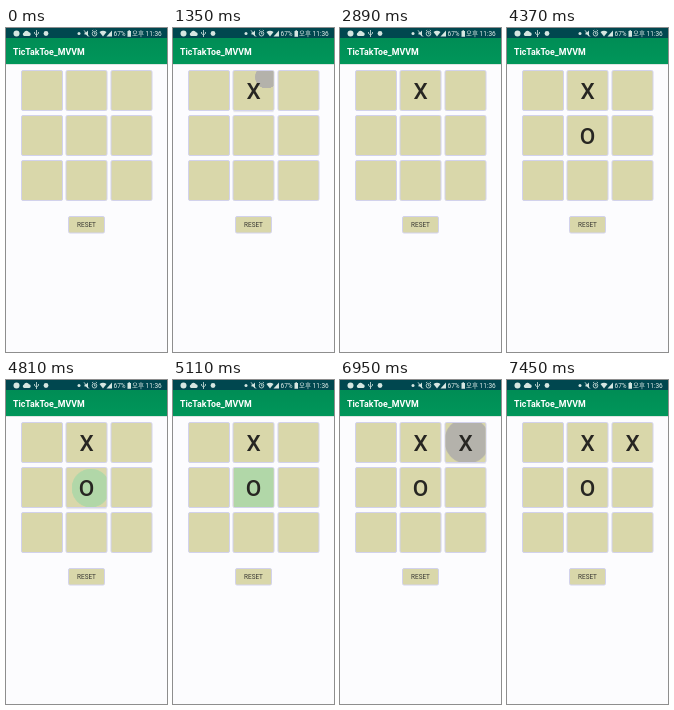
These frames come from a looping animation (161x324 px, 8000 ms). An HTML page:

```html
<!DOCTYPE html>
<html lang="ko">
<head>
<meta charset="utf-8">
<title>TicTakToe</title>
<style>
html, body { margin: 0; width: 100%; height: 100%; overflow: hidden; background: #fcfcfe; }
svg { display: block; width: 100vw; height: 100vh; }
text { font-family: Roboto, "Noto Sans CJK KR", "Noto Sans CJK", sans-serif; }
.cell { fill: #d9d7aa; stroke: #d2d2ec; stroke-width: 1; }
.mark { font-size: 22.5px; font-weight: 500; fill: #272622; text-anchor: middle; }
.status { font-size: 6.5px; fill: #e2eeea; }
.icon { fill: #d5e6e1; }
.line { fill: none; stroke: #d5e6e1; stroke-width: .8; }

.mark, .drift, .wave, .lift { animation: 8s linear infinite both; }
.lift { fill: #8a8aa0; }

.a .mark { animation-name: showA; animation-timing-function: step-end; }
.b .mark { animation-name: showB; animation-timing-function: step-end; }
.c .mark { animation-name: showC; animation-timing-function: step-end; }
@keyframes showA { 0% { opacity: 0 } 12.125%, 100% { opacity: 1 } }
@keyframes showB { 0% { opacity: 0 } 54.625%, 100% { opacity: 1 } }
@keyframes showC { 0% { opacity: 0 } 82.75%, 100% { opacity: 1 } }

/* wave: grows from the touch point, then fades */
.wave { fill: #b4b2ab; }
.b .wave { fill: #b1d7a8; }
.a .wave { animation-name: waveA; }
.b .wave { animation-name: waveB; }
.c .wave { animation-name: waveC; }
@keyframes waveA {
  0%, 12.125% { transform: scale(0); opacity: 0 }
  14% { opacity: 1 }
  25% { transform: scale(1); opacity: 1 }
  31.125%, 100% { transform: scale(1); opacity: 0 }
}
@keyframes waveB {
  0%, 54.625% { transform: scale(0); opacity: 0 }
  56.5% { opacity: 1 }
  63.5% { transform: scale(1) }
  65% { opacity: 1 }
  70.625%, 100% { transform: scale(1); opacity: 0 }
}
@keyframes waveC {
  0%, 82.75% { transform: scale(0); opacity: 0 }
  84% { opacity: 1 }
  88.375% { transform: scale(1); opacity: 1 }
  92.875%, 100% { transform: scale(1); opacity: 0 }
}

/* drift: the wave centre slides to the middle of the cell */
.drift { animation-timing-function: ease-in; }
.a .drift { animation-name: driftA; }
.b .drift { animation-name: driftB; }
.c .drift { animation-name: driftC; }
@keyframes driftA { 0%, 12.125% { transform: translate(16px, -16px) } 25%, 100% { transform: none } }
@keyframes driftB { 0%, 54.625% { transform: translate(8px, 2px) } 63.5%, 100% { transform: none } }
@keyframes driftC { 0%, 82.75% { transform: translate(4px, -3px) } 88.375%, 100% { transform: none } }

.a .lift { animation-name: liftA; }
.b .lift { animation-name: liftB; }
.c .lift { animation-name: liftC; }
@keyframes liftA { 0%, 12.125% { opacity: 0 } 15%, 19% { opacity: .18 } 22%, 100% { opacity: 0 } }
@keyframes liftB { 0%, 54.625% { opacity: 0 } 57%, 61% { opacity: .18 } 63.5%, 100% { opacity: 0 } }
@keyframes liftC { 0%, 82.75% { opacity: 0 } 84%, 88% { opacity: .15 } 91%, 100% { opacity: 0 } }
</style>
</head>
<body>
<svg viewBox="0 0 161 324" preserveAspectRatio="none">
  <defs>
    <linearGradient id="bar" x2="0" y2="1">
      <stop stop-color="#008d55"/>
      <stop offset="1" stop-color="#00965a"/>
    </linearGradient>
    <rect id="box" class="cell" x="-20.5" y="-19.5" width="41" height="40" rx="1.5"/>
    <g id="row">
      <use href="#box" x="36"/>
      <use href="#box" x="80.5"/>
      <use href="#box" x="125.5"/>
    </g>
    <clipPath id="inside"><rect x="-20" y="-19" width="40" height="39" rx="1"/></clipPath>
  </defs>

  <rect width="161" height="324" fill="#fcfcfe"/>
  <rect y="10" width="161" height="26" fill="url(#bar)"/>
  <rect y="36" width="161" height="1" fill="#dde6e3"/>
  <rect width="161" height="10" fill="#00474f"/>

  <g class="icon">
    <circle cx="10.5" cy="5.5" r="3"/>
    <path d="M18 8a1.8 1.8 0 0 1 0-3.4a2.7 2.7 0 0 1 5-.3a1.9 1.9 0 0 1 .4 3.7z"/>
    <circle cx="40" cy="5.5" r="2.4"/>
    <circle cx="73" cy="5.5" r="1.5"/>
    <path d="M78.5 4.5h1.5l2-2v6l-2-2h-1.5z"/>
    <path d="M93.5 4q3.5-2.6 7 0l-3.5 4.5z"/>
    <path d="M106 2.5v6h-5.5z"/>
    <path d="M121.5 3h1v-.8h1.5v.8h1v5.7h-3.5z"/>
  </g>
  <g class="line">
    <path d="M30.5 2v7M28.5 4v1.5l2 1.5l2-1.5v-1.5"/>
    <path d="M78 2.3l5 6.4"/>
    <circle cx="88.5" cy="5.7" r="2.3"/>
    <path d="M88.5 4.3v1.6h1.2M86 3l1.2-1M91 3l-1.2-1"/>
  </g>
  <text class="status" x="107.5" y="8">67%</text>
  <text class="status" x="126" y="8">오후 11:36</text>
  <text x="7" y="27" font-size="8.8" font-weight="700" fill="#fff">TicTakToe_MVVM</text>

  <use href="#row" y="62"/>
  <use href="#row" y="107"/>
  <use href="#row" y="152"/>

  <g class="a" transform="translate(80.5 62)">
    <rect class="lift" x="-20" y="21" width="40" height="1.2"/>
    <g clip-path="url(#inside)"><g class="drift"><circle class="wave" r="31"/></g></g>
    <text class="mark" y="9">X</text>
  </g>
  <g class="b" transform="translate(80.5 107)">
    <rect class="lift" x="-20" y="21" width="40" height="1.2"/>
    <g clip-path="url(#inside)"><g class="drift"><circle class="wave" r="31"/></g></g>
    <text class="mark" y="9">O</text>
  </g>
  <g class="c" transform="translate(125.5 62)">
    <rect class="lift" x="-20" y="21" width="40" height="1"/>
    <g clip-path="url(#inside)"><g class="drift"><circle class="wave" r="31"/></g></g>
    <text class="mark" y="9">X</text>
  </g>

  <rect class="cell" x="62.5" y="188.5" width="36" height="16.5" rx="1.5"/>
  <text x="80.5" y="199" font-size="6.4" fill="#3a3934" text-anchor="middle">RESET</text>
</svg>
</body>
</html>
```
